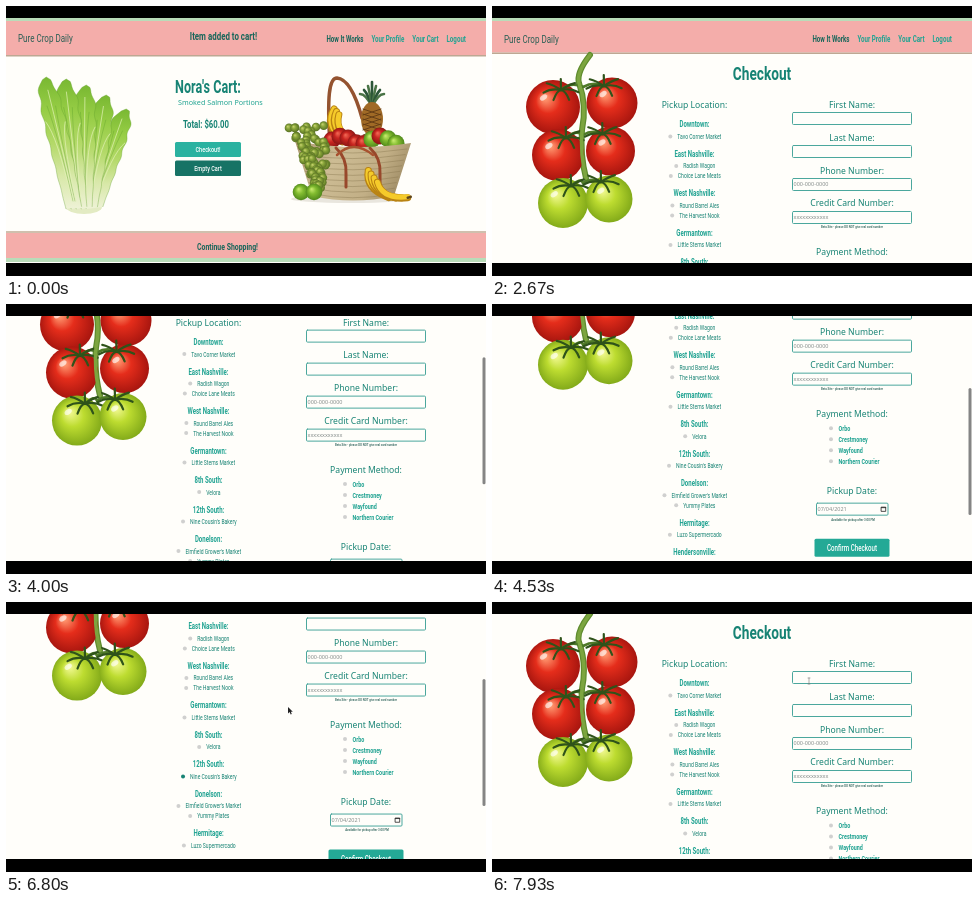
An HTML page with a canvas that plays this animation: 480x270 px, repeating every 8 s.

```html
<!DOCTYPE html>
<html lang="en">
<head>
<meta charset="utf-8">
<title>Grocery checkout</title>
<style>
html, body { margin: 0; width: 100%; height: 100%; overflow: hidden; background: #000; }
canvas { display: block; width: 100vw; height: 100vh; }
</style>
</head>
<body>
<canvas></canvas>
<script>
const LOOP = 8000, OPEN_CHECKOUT = 1870, PICK = 5400;
const DARK = '#17665a', TEAL = '#21a392', MID = '#178374', PINK = '#f4adaa', PAPER = '#fffefa';
const MINT = '#b9dcb9', DOT = '#d0d0cf';
const RED = ['#ff9a72', '#e52d1b', '#a3140e'], LIME = ['#f0f890', '#bddc30', '#7fa718'];
const APPLE = ['#ef6350', '#c92520', '#861514'], GREEN = ['#c4e86a', '#82bc30', '#4c8419'];
const GRAPE = ['#c3cf6c', '#8aa63a', '#566f22'];
const NARROW = 0.72;
const canvas = document.querySelector('canvas'), c = canvas.getContext('2d');
const ratio = window.devicePixelRatio || 1;
canvas.width = 480 * ratio;
canvas.height = 270 * ratio;

const ramp = (t, from, to) => Math.min(1, Math.max(0, (t - from) / (to - from)));
const mix = (a, b, k) => a + (b - a) * k;

function seeded(seed) {
  return () => (seed = seed * 16807 % 2147483647) / 2147483647;
}

function rect(x, y, w, h, color) {
  c.fillStyle = color;
  c.fillRect(x, y, w, h);
}

function round(x, y, w, h, color) {
  c.fillStyle = color;
  c.beginPath();
  c.roundRect(x, y, w, h, 1.5);
  c.fill();
}

function oval(x, y, rx, ry, color, turn = 0) {
  c.fillStyle = color;
  c.beginPath();
  c.ellipse(x, y, rx, ry, turn, 0, 7);
  c.fill();
}

function line(d, color, width) {
  c.strokeStyle = color;
  c.lineWidth = width;
  c.lineCap = 'round';
  c.stroke(new Path2D(d));
}

function fade(x0, y0, x1, y1, colors) {
  const g = c.createLinearGradient(x0, y0, x1, y1);
  colors.forEach((color, i) => g.addColorStop(i / (colors.length - 1), color));
  return g;
}

function ball(x, y, r, [light, main, dark]) {
  const g = c.createRadialGradient(x - r * 0.3, y - r * 0.35, r * 0.05, x, y, r * 1.05);
  g.addColorStop(0, light);
  g.addColorStop(0.4, main);
  g.addColorStop(1, dark);
  oval(x, y, r, r, g);
}

// Returns the drawn width; y is the middle of the capitals.
function text(s, x, y, size, color, { align = 'center', weight = 600, font = 'Roboto', squeeze = NARROW } = {}) {
  c.save();
  c.font = `${weight} ${size}px ${font}, sans-serif`;
  c.textAlign = align;
  c.fillStyle = color;
  c.translate(x, y + size * 0.35);
  c.scale(squeeze, 1);
  c.fillText(s, 0, 0);
  const w = c.measureText(s).width * squeeze;
  c.restore();
  return w;
}

const left = { align: 'left' };
const wide = { font: '"Noto Sans"', weight: 400, squeeze: 1 };
const label = (s, x, y) => text(s, x, y, 8.6, MID, wide);
const tiny = (s, x, y) => text(s, x, y, 4, '#245b53', { weight: 500 });

// One ruffled leaf from its foot up to its tip, with pale veins.
function leaf(footX, footY, tipX, tipY) {
  const edge = (u, side) => [
    mix(footX, tipX, u) + side * ((8 + 5 * u) * Math.sqrt(1 - u ** 6) + 1.3 * u * Math.sin(u * 38 + side)),
    mix(footY, tipY, u)];
  c.beginPath();
  for (let u = 0; u <= 1; u += 0.02) c.lineTo(...edge(u, -1));
  for (let u = 1; u >= 0; u -= 0.02) c.lineTo(...edge(u, 1));
  c.fillStyle = fade(0, tipY, 0, footY, ['#79b832', '#96cd45', '#b3d968', '#d8e8a8', '#eef2d6']);
  c.fill();
  c.strokeStyle = '#5f9f2b70';
  c.lineWidth = 0.8;
  c.stroke();
  for (let j = -2; j <= 2; j++) {
    const [x, y] = edge(0.9 - Math.abs(j) * 0.12, j * 0.45);
    line(`M${footX + j} ${footY - 8}Q${mix(footX, tipX, 0.5) + j} ${mix(footY, tipY, 0.55)} ${x} ${y}`,
      j % 2 ? '#5f9f2b60' : '#e4f2b8b0', 1);
  }
}

function lettuce() {
  oval(78, 201, 18, 7, '#e3ebc3');
  for (let i = 4; i >= 0; i--) leaf(68 + i * 5, 203, 39 + i * 20, 71 + 2 * i * i);
}

function bananas(x, y, count, turn) {
  for (let i = 0; i < count; i++) {
    c.save();
    c.translate(x + i * 5, y + i * 2);
    c.rotate(turn - i * 0.15);
    line('M-16 -9Q-10 9 15 5', '#b98313', 7);
    line('M-16 -9Q-10 8 15 4', '#f5cb2a', 5);
    line('M15 5L18 4', '#5d451c', 2.5);
    c.restore();
  }
}

function pineapple(x, y) {
  for (let i = -3; i <= 3; i++) line(`M${x} ${y - 12}Q${x + i * 2} ${y - 25} ${x + i * 4} ${y - 37 + Math.abs(i) * 4}`, i % 2 ? '#4a7446' : '#2c5638', 2.6);
  oval(x, y, 11, 17, '#a06a26');
  for (let i = 0; i < 5; i++) line(`M${x - 9} ${y - 10 + i * 5}l18 6m0 -6l-18 6`, '#623c15', 0.9);
}

function grapes() {
  const random = seeded(29), count = 75;
  for (let i = 0; i < count; i++) {
    const u = i / count;
    ball(302 + 13 * u + (random() - 0.5) * mix(38, 10, u), 117 + 62 * u + random() * 6, 4.3, GRAPE);
  }
}

function basket() {
  oval(345, 193, 60, 4, '#e9e6de');
  line('M324 140C321 90 323 72 331 72C342 73 350 90 356 112', '#94532f', 3.5);
  pineapple(366, 113);
  bananas(331, 121, 3, 0.9);
  for (let i = 0; i < 9; i++) ball(326 + i * 8, 134 - 4 * Math.sin(i * 1.3), 8.5, i % 3 && i > 4 ? GREEN : APPLE);
  c.fillStyle = fade(290, 130, 405, 195, ['#a8946a', '#cdbc94', '#c2af86', '#8d7a54']);
  c.fill(new Path2D('M289 135Q348 146 405 137L388 190Q347 199 306 190Z'));
  for (let i = 0; i < 9; i++) {
    const y = 143 + i * 5.6;
    line(`M${292 + i * 1.8} ${y}Q347 ${y + 8} ${401 - i * 1.8} ${y}`, '#85734d80', 0.8);
  }
  for (const x of [330, 364]) line(`M${x} 142q11 10 10 26v13`, '#98482b', 3);
  line('M331 149Q347 133 367 149', '#a8522f', 2.5);
  grapes();
  for (const x of [295, 308]) ball(x, 186, 8.3, GREEN);
  bananas(372, 180, 4, 0.5);
}

function calyx(x, y) {
  for (let i = 0; i < 7; i++) {
    const a = i * 0.9 + 0.2, dx = Math.cos(a), dy = Math.sin(a);
    line(`M${x} ${y}Q${x + dx * 10} ${y + dy * 4 - 3} ${x + dx * 18} ${y + dy * 11}`, '#2f531a', 2.2);
  }
}

function tomatoes() {
  line('M98 40Q84 58 87 68Q95 90 90 115Q88 140 94 163', '#5f8c2e', 6);
  for (let row = 0; row < 3; row++) {
    const y = 92 + row * 48, colors = row < 2 ? RED : LIME;
    for (const [x, top, r, side] of [[61 + row * 5, y, 27 - row, 1], [120 - row * 1.5, y - 4, 25.5 - row, -1]]) {
      ball(x, top, r, colors);
      oval(x - r * 0.35, top - r * 0.35, 4, 2.5, '#ffffffa0', -0.6);
      line(`M91 ${y - 20}Q${x + side * 18} ${y - 26} ${x + side * 8} ${top - 17}`, '#4f7a28', 2.6);
      calyx(x + side * 8, top - 17);
    }
  }
  line('M98 40Q84 58 87 68Q95 90 90 115Q88 140 94 163', '#7ca53f', 3.5);
}

function header(top, bottom, textY) {
  rect(0, top, 480, 3, MINT);
  rect(0, top + 3, 480, bottom - top - 3, PINK);
  rect(0, bottom, 480, 1.5, '#bda893');
  text('Pure Crop Daily', 12, textY, 11.2, '#2b5f55', { ...left, weight: 400 });
  let x = 320.5;
  for (const s of ['How It Works', 'Your Profile', 'Your Cart', 'Logout']) {
    x += text(s, x, textY, 8.6, s === 'How It Works' ? DARK : TEAL, left) + 8;
  }
}

function footer(y, s, x) {
  rect(0, y - 2, 480, 2, '#cfc0ae');
  rect(0, y, 480, 25, PINK);
  rect(0, y + 25, 480, 4, MINT);
  text(s, x, y + 14, 9.6, DARK, { weight: 700 });
}

function button(s, x, y, w, h, color, size = 7.7) {
  round(x, y, w, h, color);
  text(s, x + w / 2, y + h / 2, size, '#fff', { weight: 500 });
}

function cartPage() {
  header(12, 49, 32.5);
  text('Item added to cart!', 217.5, 30.5, 11, DARK, { weight: 700 });
  text("Nora's Cart:", 169, 81, 17.5, MID, left);
  text('Smoked Salmon Portions', 172, 96, 7.2, TEAL, { ...wide, ...left });
  text('Total: $60.00', 177, 118, 10.8, MID, left);
  button('Checkout!', 169, 136, 66, 15, '#2bb2a0');
  button('Empty Cart', 169, 154.5, 66, 15.5, '#177365');
  lettuce();
  basket();
  footer(227, 'Continue Shopping!', 221.5);
}

function field(x, y, w, value = '') {
  c.strokeStyle = '#4ba79d';
  c.lineWidth = 1;
  c.beginPath();
  c.roundRect(x + 0.5, y + 0.5, w - 1, 12, 1);
  c.stroke();
  text(value, x + 1.5, y + 6.5, 5.5, '#858d8b', { ...wide, ...left });
}

const places = {
  'Downtown:': ['Tavo Corner Market'],
  'East Nashville:': ['Radish Wagon', 'Choice Lane Meats'],
  'West Nashville:': ['Round Barrel Ales', 'The Harvest Nook'],
  'Germantown:': ['Little Stems Market'],
  '8th South:': ['Velora'],
  '12th South:': ["Nine Cousin's Bakery"],
  'Donelson:': ["Elmfield Grower's Market", 'Yummy Plates'],
  'Hermitage:': ['Luzo Supermercado'],
  'Hendersonville:': ['Millbrookton Produce']
};

function pickupList(picked) {
  let y = 109.5;
  for (const [area, shops] of Object.entries(places)) {
    text(area, 202.5, y, 8.4, TEAL);
    y += 2;
    for (const shop of shops) {
      y += 10;
      const w = text(shop, 207.3, y, 7, MID, { weight: 400 });
      oval(207.3 - w / 2 - 7, y, 2, 2, picked && area === '12th South:' ? MID : DOT);
    }
    y += 17.5;
  }
}

const fields = { 'First Name:': '', 'Last Name:': '', 'Phone Number:': '000-000-0000', 'Credit Card Number:': 'xxxxxxxxxxxx' };
const cards = ['Orbo', 'Crestmoney', 'Wayfound', 'Northern Courier'];

function checkoutPage(t) {
  header(3, 37.5, 24);
  tomatoes();
  text('Checkout', 270, 58, 19, MID);
  label('Pickup Location:', 202.5, 90);
  pickupList(t >= PICK);
  Object.entries(fields).forEach(([name, value], i) => {
    const y = 90 + i * 32.8;
    label(name, 360, y);
    field(300, Math.round(y + 7.3), 120, value);
  });
  tiny('Beta Site - please DO NOT give real card number', 360, 212);
  label('Payment Method:', 360, 237);
  cards.forEach((s, i) => {
    const y = 251.5 + i * 11;
    oval(339, y, 2, 2, DOT);
    text(s, 346.5, y, 7.5, TEAL, left);
  });
  label('Pickup Date:', 360, 314.5);
  field(324, 326, 72.5, '07/04/2021');
  line('M389.5 330.5h4.2v4.2h-4.2zM389.5 331h4.2', '#222', 0.8);
  tiny('Available for pickup after 3:00 PM', 361, 342.5);
  button('Confirm Checkout', 322.5, 362, 75, 18, '#24a996', 8.6);
  footer(400.5, 'Head Back to Cart', 214.5);
}

const arrow = new Path2D('M0 0V6.5L1.6 5.1L2.7 7.4L3.8 6.9L2.8 4.7H4.8Z');
const hand = new Path2D('M-.8 .6Q0 -.6 .8 .6V3L3.3 3.8V6.3L2.4 8H-1L-3 4.8L-2 4.2L-.8 5.2Z');

// Each move is [start, end, x, y].
const moves = [[70, 670, 231, 161], [1000, 1070, 205, 143], [1870, 2130, 222, 140], [2200, 2270, 266, 124],
  [2600, 2670, 180, 290], [5000, 5200, 174, 106], [5550, 5730, 282, 105], [7670, 7900, 317, 79]];

function cursor(t) {
  let x = 486, y = 256;
  for (const [from, to, nextX, nextY] of moves) {
    const k = ramp(t, from, to);
    x = mix(x, nextX, k);
    y = mix(y, nextY, k);
  }
  c.save();
  c.translate(x, y);
  if (t > 7880) {
    line('M-1 -3H1M0 -3V3M-1 3H1', '#777', 0.6);
  } else {
    const pointing = t >= 1040 && t < OPEN_CHECKOUT;
    const shape = pointing ? hand : arrow;
    c.fillStyle = pointing ? '#fff' : '#222';
    c.strokeStyle = pointing ? '#222' : '#fff';
    c.lineWidth = 0.7;
    c.stroke(shape);
    c.fill(shape);
  }
  c.restore();
}

function thumb(t, scroll) {
  const shown = (from, to) => ramp(t, from, from + 60) - ramp(t, to, to + 140);
  c.globalAlpha = shown(3200, 5100) + shown(6100, 7740);
  round(476.5, 9 + 0.55 * scroll, 3, 127, '#858585');
  c.globalAlpha = 1;
}

function draw(now) {
  const t = now % LOOP;
  c.setTransform(ratio, 0, 0, ratio, 0, 0);
  rect(0, 0, 480, 270, '#000');
  c.save();
  c.beginPath();
  c.rect(0, 12, 480, 245);
  c.clip();
  rect(0, 12, 480, 245, PAPER);
  if (t < OPEN_CHECKOUT) {
    cartPage();
  } else {
    const scroll = 188 * ramp(t, 3240, 5020) - 151 * ramp(t, 6130, 7700);
    c.save();
    c.translate(0, 9 - scroll);
    checkoutPage(t);
    c.restore();
    thumb(t, scroll);
  }
  cursor(t);
  c.restore();
}

const start = performance.now();
function tick() {
  draw(performance.now() - start);
  requestAnimationFrame(tick);
}
tick();
</script>
</body>
</html>
```
